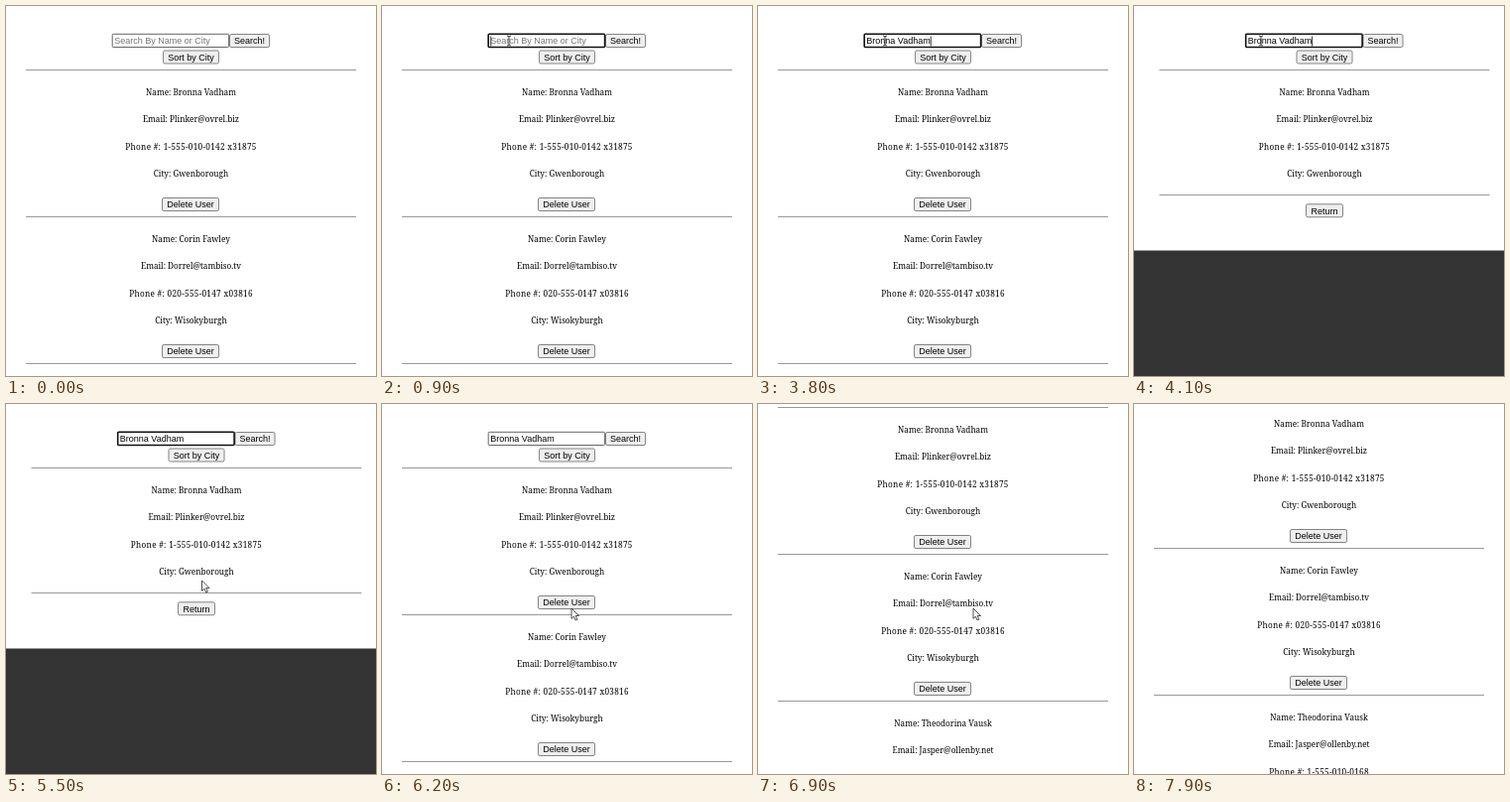
An HTML page for the animation above (8 s loop, 373x373 px).

```html
<!DOCTYPE html>
<html lang="en">
<head>
<meta charset="utf-8">
<title>User search</title>
<style>
  html, body { margin: 0; width: 100%; height: 100%; overflow: hidden; background: #fff; }
  svg { display: block; width: 100vw; height: 100vh; }
  text { white-space: pre; }
  .info { font: 8.2px "Noto Serif", serif; fill: #000; text-anchor: middle; }
  .phone { letter-spacing: .3px; }
  .ui { font: 9px "Liberation Sans", Arial, sans-serif; fill: #000; }
  .label { text-anchor: middle; }
  .hint { fill: #757575; }
  .button { fill: #efefef; stroke: #767676; stroke-width: .9; }
  .rule { fill: #999; }
  .field { fill: #fff; stroke: #666; stroke-width: 1; }
  .field.focused { stroke: #101010; stroke-width: 1.6; }
</style>
</head>
<body>
<svg viewBox="0 0 373 373">
  <rect id="dark" y="246.5" width="373" height="127" fill="#333"/>
  <g id="page">
    <g id="form"></g>
    <g id="list"></g>
    <g id="result"></g>
  </g>
  <g id="arrow">
    <path d="M0 0V10.4L2.4 8.2L4.1 12L5.9 11.2L4.2 7.5H7.5Z" fill="#fff" stroke="#222" stroke-width=".8"/>
  </g>
  <g id="beam">
    <path d="M-2-5Q0-5 0-3.8Q0-5 2-5M0-4V4M-2 5Q0 5 0 3.8Q0 5 2 5" fill="none" stroke="#222" stroke-width=".9"/>
  </g>
</svg>
<script>
const LOOP = 8000, TICK = 100, BLINK = 500;
const FOCUS = 900, TYPE = 1600, SEARCH = 4100, BLUR = 6000, RETURN = 6200, SCROLL = 6600;
const CENTER = 186.5, LINE = 27.6, CARD = 148, FIRST = 89.5;
const QUERY = "Bronna Vadham";
const USERS = [
  [QUERY, "Plinker@ovrel.biz", "1-555-010-0142 x31875", "Gwenborough"],
  ["Corin Fawley", "Dorrel@tambiso.tv", "020-555-0147 x03816", "Wisokyburgh"],
  ["Theodorina Vausk", "Jasper@ollenby.net", "1-555-010-0168", ""]
];

const ENTRY = { x: -20, y: 345 };
const MOVES = [
  { at: 0, time: 600, x: 118, y: 11 },
  { at: 600, time: 200, x: 128, y: 35 },
  { at: 5200, time: 300, x: 197.5, y: 178 },
  { at: 5500, time: 300, x: 191, y: 206 },
  { at: 6300, time: 300, x: 217, y: 206 },
  { at: 7100, time: 300, x: 166, y: 329 },
  { at: 7400, time: 500, x: 205, y: -20 }
];

const $ = id => document.getElementById(id);

function add(parent, tag, attrs, content) {
  const el = document.createElementNS("http://www.w3.org/2000/svg", tag);
  for (const name in attrs) el.setAttribute(name, attrs[name]);
  if (content) el.textContent = content;
  return parent.appendChild(el);
}

function button(parent, x, y, width, label) {
  add(parent, "rect", { class: "button", x, y, width, height: 13, rx: 1.6 });
  add(parent, "text", { class: "ui label", x: x + width / 2, y: y + 9.7 }, label);
}

function rule(parent, y) {
  add(parent, "rect", { class: "rule", x: 20, y, width: 333, height: 1 });
}

function details(parent, user, top) {
  ["Name", "Email", "Phone #", "City"].forEach((key, i) => {
    const cls = key === "Phone #" ? "info phone" : "info";
    add(parent, "text", { class: cls, x: CENTER, y: top + i * LINE }, `${key}: ${user[i]}`);
  });
}

const form = $("form");
button(form, 225.5, 28.5, 40, "Search!");
button(form, 158.5, 45, 56, "Sort by City");
rule(form, 64);
const field = add(form, "rect", { x: 107.2, y: 28.3, width: 117.4, height: 13.2, rx: 1 });
const typed = add(form, "text", { x: 109.3, y: 38.2 });
const caret = add(form, "rect", { y: 30.5, width: .8, height: 10 });

USERS.forEach((user, i) => {
  const top = i * CARD;
  details($("list"), user, FIRST + top);
  button($("list"), 157.5, 193.5 + top, 57, "Delete User");
  rule($("list"), 212 + top);
});

details($("result"), USERS[0], FIRST);
rule($("result"), 190);
button($("result"), 168, 199.8, 37, "Return");

// eased progress from 0 to 1 over a span of time
function ease(t, at, time) {
  const p = Math.min(1, Math.max(0, (t - at) / time));
  const a = p ** 2.1, b = (1 - p) ** 2.1;
  return a / (a + b);
}

function pointer(t) {
  return MOVES.reduce((from, to) => {
    const p = ease(t, to.at, to.time);
    return { x: from.x + (to.x - from.x) * p, y: from.y + (to.y - from.y) * p };
  }, ENTRY);
}

// typing slows down slightly with each key
const keyTime = i => TYPE + 140 * i + 3.6 * i * i;

function show(el, on) {
  el.setAttribute("visibility", on ? "visible" : "hidden");
}

function drawField(t) {
  const focused = t >= FOCUS && t < BLUR;
  let count = 0;
  while (count < QUERY.length && keyTime(count) <= t) count++;
  field.setAttribute("class", focused ? "field focused" : "field");
  typed.setAttribute("class", count ? "ui" : "ui hint");
  typed.textContent = count ? QUERY.slice(0, count) : "Search By Name or City";
  const last = count ? keyTime(count - 1) : FOCUS;
  const end = count ? typed.getComputedTextLength() : 0;
  caret.setAttribute("x", 109.4 + end);
  show(caret, focused && Math.floor((t - last) / BLINK) % 2 === 0);
}

function draw(t) {
  const searching = t >= SEARCH && t < RETURN;
  const scroll = Math.round(67 * ease(t, SCROLL, 400));
  const { x, y } = pointer(t);
  const overField = x > 107 && x < 225 && y > 28 && y < 42;
  drawField(t);
  show($("dark"), searching);
  show($("result"), searching);
  show($("list"), !searching);
  $("page").setAttribute("transform", `translate(${searching ? 5.5 : 0} ${-scroll})`);
  for (const id of ["arrow", "beam"]) {
    $(id).setAttribute("transform", `translate(${x} ${y})`);
    show($(id), (id === "beam") === overField);
  }
}

const start = performance.now();
function frame() {
  const t = (performance.now() - start) % LOOP;
  draw(Math.floor(t / TICK) * TICK);
  requestAnimationFrame(frame);
}
frame();
</script>
</body>
</html>
```
